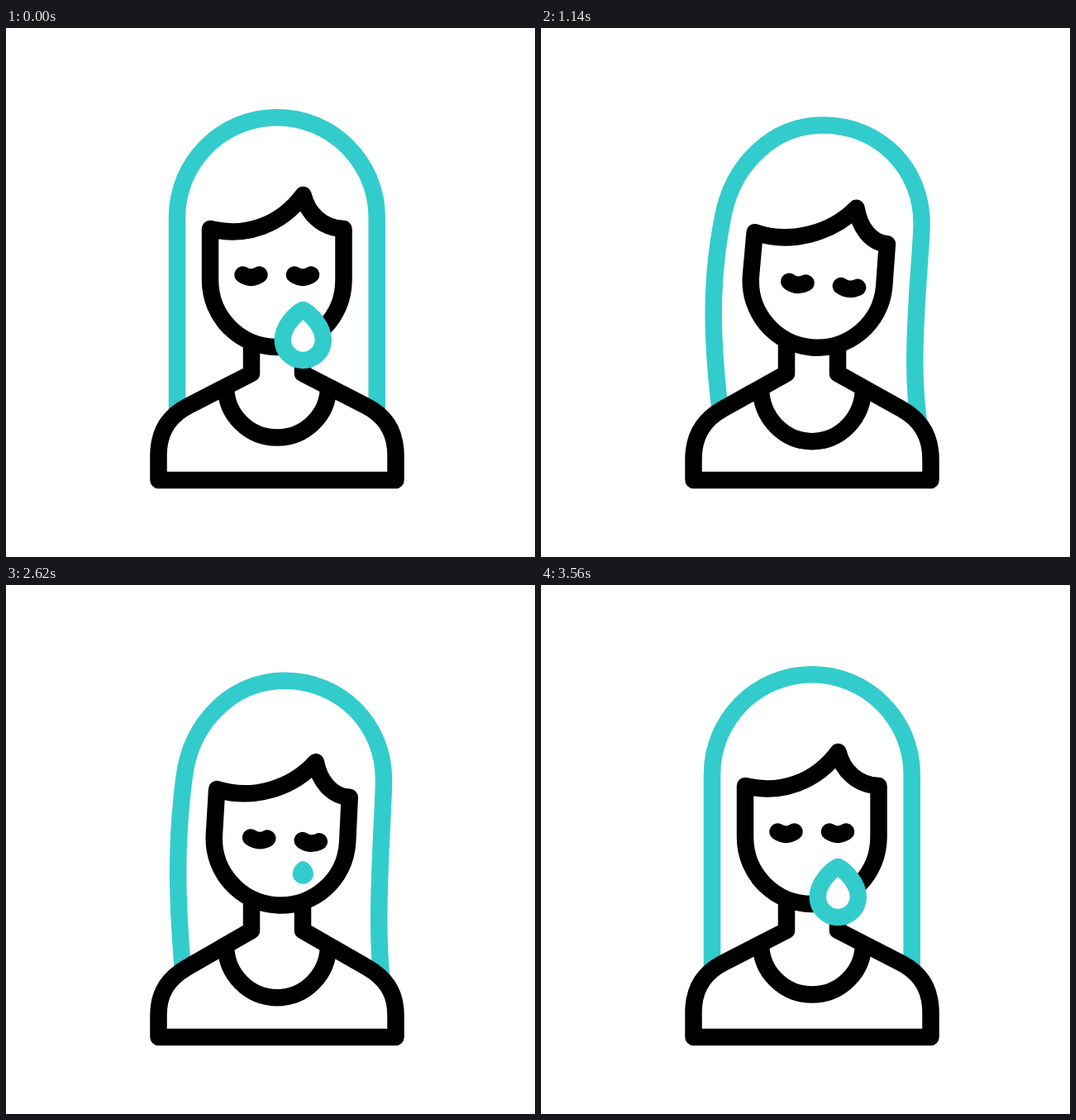
Write an HTML page that moves like this. It is 640x640 px and loops after 3.6 s.

```html
<!DOCTYPE html>
<html lang="en">
<head>
<meta charset="utf-8">
<style>
  html, body { margin: 0; height: 100%; overflow: hidden; background: #fff; }
  svg { display: block; width: 100vw; height: 100vh; }
  path { fill: none; stroke: #000; stroke-width: 20.5; stroke-linejoin: round; }
  #hair, #drop { stroke: #3cc; }
  #body, #drop { fill: #fff; }
  #eyes { stroke-linecap: round; }
</style>
</head>
<body>
<svg viewBox="0 0 640 640">
  <path id="hair"/>
  <path id="body"/>
  <path id="collar"/>
  <path id="face"/>
  <path id="eyes"/>
  <path id="drop"/>
</svg>
<script>
const LOOP = 3600;
const el = id => document.getElementById(id);

// Each part has an upright and a tilted shape with matching points.
const shapes = {
  hair: [
    'M207 485C207 435 207 390 207 345C207 308 207 270 207 229C207 162.5 261 108.2 327.8 108.2' +
    'C394.5 108.2 448.7 162.5 448.7 229C448.7 275 448.7 335 448.7 405C448.7 432 448.7 460 448.7 485',
    'M222 485C214 435 209 390 209 345C209 308 213 270 222 232C236 165 285 119.5 344 119.5' +
    'C413 119.5 464 172 463 240C462 275 453 335 453 405C453 432 455.5 460 460 485'
  ],
  face: [
    'M247 243C290 254 333 238 359.5 202C365 225 383 242 408.5 243L408.5 305' +
    'C408.5 350 372.5 386 328 386C283 386 247 350 247 305Z',
    'M261 248C304 264 356 250 386 221C389 243 402 264 421 265L416.5 314.6' +
    'C411.8 359 371.9 391.2 327.4 386.5C282.9 381.8 250.7 341.9 255.5 297.4Z'
  ],
  eyes: [
    'M286.5 298.5Q296.5 305 306.5 298.5M349 298.5Q359 305 369 298.5',
    'M303 308.5Q312.5 315.5 323.4 310.6M365.7 314.7Q375 321.5 386 317'
  ]
};

function mix([from, to], k) {
  const ends = to.match(/[\d.]+/g);
  let i = 0;
  return from.replace(/[\d.]+/g, n => +n + (ends[i++] - n) * k);
}

function ease(t, start, end) {
  const p = Math.min(1, Math.max(0, (t - start) / (end - start)));
  return p * p * (3 - 2 * p);
}

function drawBody(tilt, raise) {
  const slope = (39.5 + 8 * tilt - 19.5 * raise) / 77;
  const top = 418 + 77 * slope;
  const side = 517 + 6 * tilt;
  const bend = (top + side) / 2;
  const handle = top + 22 * slope;
  el('body').setAttribute('d',
    `M297 383V418L220 ${top}C198 ${handle} 184.5 ${bend} 184.5 ${side}V547` +
    `H471.5V${side}C471.5 ${bend} 458 ${handle} 436 ${top}L359 418V383`);

  const collarTop = 418 + 31 * slope;
  const collarLow = 495.5 + 6.5 * tilt - 4.5 * raise;
  el('collar').setAttribute('d',
    `M266 ${collarTop}A62 ${collarLow - collarTop} 0 0 0 390 ${collarTop}`);
}

function drawDrop(t, nod) {
  const falling = t < 1500;
  const fall = falling ? ease(t, 120, 840) : 0;
  const size = falling ? 1 + 0.4 * fall : ease(t, 2300, 3440);
  const x = n => 359.3 + n * size;
  const y = n => 341 + nod + 51 * fall + n * size;
  const r = 24.5 * size;
  const drop = el('drop');
  drop.setAttribute('d',
    `M${x(0)} ${y(0)}C${x(-9)} ${y(4.5)} ${x(-24.5)} ${y(20)} ${x(-24.5)} ${y(36.5)}` +
    `A${r} ${r} 0 0 0 ${x(24.5)} ${y(36.5)}C${x(24.5)} ${y(20)} ${x(9)} ${y(4.5)} ${x(0)} ${y(0)}Z`);
  drop.style.strokeWidth = 20.5 * Math.min(1, size * 4);
  // Blend fill and stroke as one layer.
  drop.style.opacity = size > 0 ? 1 - fall : 0;
}

function draw(now) {
  const t = now % LOOP;
  const tilt = ease(t, 520, 1360) - ease(t, 1960, 3440);
  const raise = ease(t, 120, 520) - ease(t, 520, 1360);
  const nod = 5 * (ease(t, 1700, 2240) - ease(t, 2300, 2760) + ease(t, 2760, 3000) - ease(t, 3260, 3540));

  for (const id in shapes) {
    el(id).setAttribute('d', mix(shapes[id], tilt));
    el(id).setAttribute('transform', `translate(0 ${nod})`);
  }
  drawBody(tilt, raise);
  drawDrop(t, nod);
  requestAnimationFrame(() => draw(performance.now()));
}
draw(performance.now());
</script>
</body>
</html>
```
